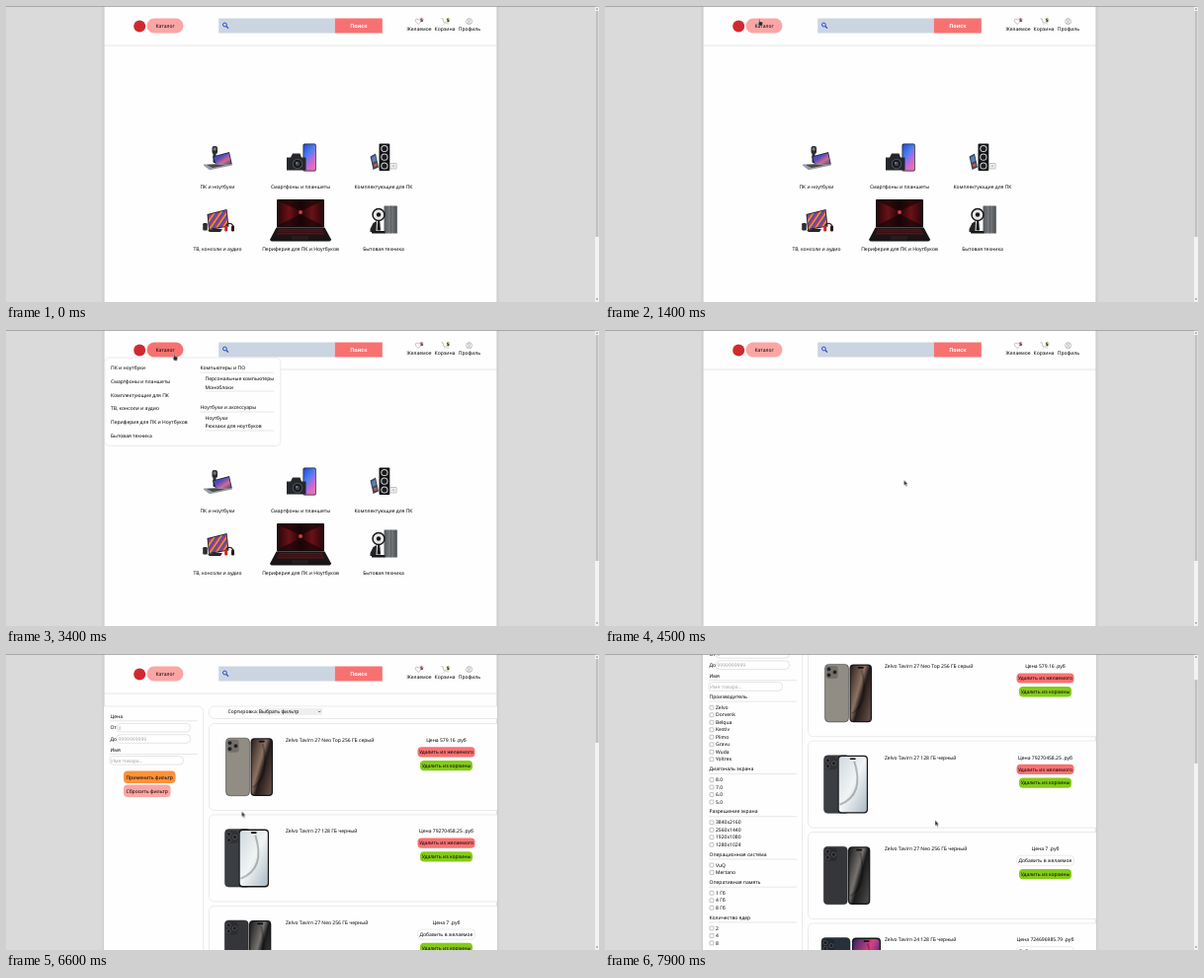
An HTML page for the animation above (8000 ms loop, 600 px wide and 300 px high).

```html
<!DOCTYPE html>
<html lang="ru">
<head>
<meta charset="utf-8">
<title>Каталог</title>
<style>
html, body { margin: 0; width: 100%; height: 100%; overflow: hidden; background: #dadada; }
svg { display: block; width: 600px; height: 300px; }
text { font: 5px "Noto Sans", "Open Sans", sans-serif; fill: #000; text-rendering: geometricPrecision; white-space: pre; }
.mid { text-anchor: middle; }
.hint { fill: #a6a6a6; }
.find { font-weight: 600; font-size: 5.4px; fill: #fff; }
.count { font-weight: 700; font-size: 4.6px; }
.line { stroke: #cfcfcf; stroke-width: .5; }
.box { fill: #fefefe; stroke: #dedede; stroke-width: .6; }
.field { fill: #fff; stroke: #cbcbcb; stroke-width: .5; }
.check { fill: #fff; stroke: #777; stroke-width: .45; }
.icon { fill: none; stroke: #999; stroke-width: .6; }
.column { fill: #fefefe; filter: drop-shadow(0 0 1.5px rgba(0,0,0,.22)); }

.home, .menu, .sub, .shop, .short, .extra, .early, .arrow, .hand { animation: 8s step-end infinite; }
.home { animation-name: home; }
.menu { animation-name: menu; }
.sub { animation-name: sub; }
.shop { animation-name: shop; }
.short { animation-name: short; }
.extra { animation-name: extra; }
.early { animation-name: early; }
.arrow { animation-name: arrow; }
.hand { animation-name: hand; }
.scroll { animation: scroll 8s linear infinite; }
.thumb { animation: thumb 8s linear infinite; }
.catalog { animation: catalog 8s linear infinite; }
.cursor { animation: move 8s ease-in-out infinite; }

@keyframes home { 0% { visibility: visible } 54.4%, 100% { visibility: hidden } }
@keyframes menu { 0% { visibility: hidden } 19.4% { visibility: visible } 47%, 100% { visibility: hidden } }
@keyframes sub { 0% { visibility: hidden } 58.75% { visibility: visible } 78.1%, 100% { visibility: hidden } }
@keyframes shop { 0% { visibility: hidden } 80.6%, 100% { visibility: visible } }
@keyframes short { 0% { visibility: visible } 80.6%, 100% { visibility: hidden } }
@keyframes early { 0% { visibility: hidden } 80.6% { visibility: visible } 84.4%, 100% { visibility: hidden } }
@keyframes extra { 0% { visibility: hidden } 84.4%, 100% { visibility: visible } }
@keyframes arrow {
  0% { visibility: hidden } 1.2% { visibility: visible } 15% { visibility: hidden }
  54.4% { visibility: visible } 58.75% { visibility: hidden } 78.1%, 100% { visibility: visible }
}
@keyframes hand {
  0% { visibility: hidden } 15% { visibility: visible } 54.4% { visibility: hidden }
  58.75% { visibility: visible } 78.1%, 100% { visibility: hidden }
}
@keyframes catalog { 0%, 17.6% { fill: #fca5a5 } 19.4%, 46% { fill: #f87171 } 48%, 100% { fill: #fca5a5 } }
@keyframes scroll { 0%, 91.2% { transform: none } 98%, 100% { transform: translateY(-74.8px) } }
@keyframes thumb { 0%, 91.2% { transform: none } 98%, 100% { transform: translateY(21px) } }
@keyframes move {
  0%, 1.5% { transform: translate(300px, 225px) }
  15.6%, 18% { transform: translate(155px, 13px) }
  21% { transform: translate(160px, 19px) }
  25% { transform: translate(150px, 37px) }
  29% { transform: translate(142px, 64px) }
  34% { transform: translate(212px, 58px) }
  38% { transform: translate(200px, 48px) }
  41.2%, 44.4% { transform: translate(169px, 23.7px) }
  52% { transform: translate(302px, 150px) }
  56.2%, 58.75% { transform: translate(302.5px, 152px) }
  67.5%, 78.1% { transform: translate(225px, 154px) }
  82%, 83.5% { transform: translate(238.5px, 159.5px) }
  90%, 100% { transform: translate(334px, 168.5px) }
}
</style>
</head>
<body>
<svg viewBox="0 0 600 300" xmlns="http://www.w3.org/2000/svg">
  <defs>
    <clipPath id="clip"><rect x="99.5" y="0" width="397" height="600"/></clipPath>
    <linearGradient id="vivid" x2="1" y2="1"><stop stop-color="#2a3f9c"/><stop offset=".4" stop-color="#5a4fc0"/><stop offset=".65" stop-color="#d9688a"/><stop offset="1" stop-color="#28489c"/></linearGradient>
    <linearGradient id="stripes" x2=".22" y2=".14" spreadMethod="repeat"><stop stop-color="#c4262f"/><stop offset=".35" stop-color="#e9a82f"/><stop offset=".6" stop-color="#3a52c4"/><stop offset="1" stop-color="#c12f84"/></linearGradient>
    <linearGradient id="sky" x2=".6" y2="1"><stop stop-color="#2348cf"/><stop offset=".45" stop-color="#4e7ff0"/><stop offset=".7" stop-color="#b06be0"/><stop offset="1" stop-color="#e86fb4"/></linearGradient>
    <linearGradient id="violet" x2=".5" y2="1"><stop stop-color="#3f55b8"/><stop offset=".5" stop-color="#5a3fb0"/><stop offset="1" stop-color="#4f86cf"/></linearGradient>
    <linearGradient id="bronze" x2="1" y2=".8"><stop stop-color="#2a211e"/><stop offset=".45" stop-color="#8c7263"/><stop offset=".6" stop-color="#231b19"/><stop offset="1" stop-color="#5e4a41"/></linearGradient>
    <linearGradient id="ice" x2="1" y2="1"><stop stop-color="#cfd8de"/><stop offset=".5" stop-color="#f1f4f5"/><stop offset="1" stop-color="#a9b9c4"/></linearGradient>
    <linearGradient id="smoke" x2="1" y2=".8"><stop stop-color="#1b1b1d"/><stop offset=".45" stop-color="#77736f"/><stop offset=".6" stop-color="#1a1a1b"/><stop offset="1" stop-color="#474543"/></linearGradient>
    <linearGradient id="neon" x2="1" y2="1"><stop stop-color="#33246b"/><stop offset=".4" stop-color="#d9417f"/><stop offset=".65" stop-color="#3c2f8f"/><stop offset="1" stop-color="#e0645c"/></linearGradient>
    <linearGradient id="ember"><stop stop-color="#2a080b"/><stop offset=".25" stop-color="#6b1117"/><stop offset=".5" stop-color="#1c0608"/><stop offset=".75" stop-color="#6b1117"/><stop offset="1" stop-color="#2a080b"/></linearGradient>
    <linearGradient id="steel"><stop stop-color="#55585c"/><stop offset=".5" stop-color="#7d8083"/><stop offset="1" stop-color="#4a4d50"/></linearGradient>
  </defs>
  <rect class="column" x="99.5" y="-10" width="397" height="320"/>
  <g clip-path="url(#clip)"><g class="scroll" id="page"></g></g>
  <rect width="600" height=".8" fill="#9c9c9c"/>
  <rect x="596" y=".8" width="4" height="300" fill="#f3f3f3"/>
  <path d="M596.9 3.6h2.2l-1.1-1.5zM596.9 296.6h2.2l-1.1 1.5z" fill="#666"/>
  <rect class="short" x="596.5" y="5" width="3" height="229" fill="#c0c0c0"/>
  <g class="shop"><rect class="thumb" x="596.5" y="5" width="3" height="85" fill="#c0c0c0"/></g>
  <g class="cursor" stroke="#fff" stroke-width=".35" fill="#2b2b2b" stroke-linejoin="round">
    <path class="arrow" d="M0 0V5.6L1.3 4.5 2.2 6.6 3.2 6.2 2.3 4.2H4z"/>
    <path class="hand" d="M.6.5Q1.2-.2 1.7.5V2.7L4.2 3.2Q4.9 3.5 4.7 4.3L4.1 7.2H1.3L-.5 4.6Q-.3 3.8.6 4.4z"/>
  </g>
</svg>
<script>
// Text is placed by its vertical centre.
const text = (x, y, s, cls = '') => `<text x="${x}" y="${y + 1.8}" class="${cls}">${s}</text>`;
const mid = (x, y, s, cls = '') => text(x, y, s, 'mid ' + cls);
const rect = (x, y, w, h, fill, r = 0, more = '') =>
  `<rect x="${x}" y="${y}" width="${w}" height="${h}" rx="${r}" ${fill ? `fill="${fill}"` : ''} ${more}/>`;
const frame = (x, y, w, h, r, cls) => rect(x, y, w, h, '', r, `class="${cls}"`);
const disc = (x, y, r, fill, more = '') => `<circle cx="${x}" cy="${y}" r="${r}" fill="${fill}" ${more}/>`;
const path = (d, fill, more = '') => `<path d="${d}" fill="${fill}" ${more}/>`;
const rule = (x1, x2, y) => `<path class="line" d="M${x1} ${y}H${x2}"/>`;
const group = (cls, ...parts) => `<g class="${cls}">${parts.join('')}</g>`;
const ring = (color, w) => `stroke="${color}" stroke-width="${w}"`;

const kinds = ['ПК и ноутбуки', 'Смартфоны и планшеты', 'Комплектующие для ПК',
  'ТВ, консоли и аудио', 'Периферия для ПК и Ноутбуков', 'Бытовая техника'];

const header = () => [
  disc(135.2, 20.5, 6, '#cf2a30'),
  rect(142.5, 12.5, 37, 15, '', 7.5, 'class="catalog"'),
  mid(161, 20, 'Каталог'),
  rect(215.2, 12.5, 117.6, 15, '#cbd5e1'),
  disc(221.4, 19, 1.9, 'none', ring('#1d3fd0', .9)),
  path('M222.8 20.5L225 22.7', 'none', ring('#1d3fd0', 1.1)),
  rect(332.8, 12.5, 48, 15, '#f87171'),
  mid(356.8, 20, 'Поиск', 'find'),
  '<path class="icon" d="M417.2 18.6L414.6 15.8Q413.6 13.8 415.2 13.1 416.6 12.8 417.2 14.2 418 12.8 419.2 13.1 420.8 13.9 419.8 15.8z"/>',
  disc(420.6, 14, 2.3, '#fbd0d0'), mid(420.6, 14, '5', 'count'),
  '<path class="icon" d="M440.5 12.8H442L443.2 17H447.6L448.6 13.8M443.4 18.4h.6M446.8 18.4h.6"/>',
  disc(447.4, 14, 2.3, '#dcefb4'), mid(447.4, 14, '5', 'count'),
  '<path class="icon" d="M471.6 15.6a3 3 0 1 1-6 0a3 3 0 1 1 6 0M469.8 14.8a1.2 1.2 0 1 1-2.4 0a1.2 1.2 0 1 1 2.4 0M466.6 17.7Q468.6 15.8 470.6 17.7"/>',
  mid(418, 23.3, 'Желаемое'), mid(444, 23.3, 'Корзина'), mid(469, 23.3, 'Профиль'),
  rule(99, 497, 40)
].join('');

const art = [
  // laptop with a small camera
  rect(208.5, 142, 5.5, 8, '#2a2b30', 2) + disc(211.2, 145, 1.7, '#777') + rect(209.5, 149, 3, 10, '#2c2c33', 1) +
  path('M209 152.5L226 148 228.8 160.5 212.5 162z', '#1f2028') +
  path('M210 153L225.4 149 227.9 159.8 213 161.2z', 'url(#vivid)') +
  path('M200 160.5L211.5 160 228.8 160.5 228.8 161.6 206 166.2 200 161.8z', '#9a9da2') +
  path('M203 161L212.5 160.6 222 161.6 209 164z', '#45484f'),
  // camera and phone
  rect(300.5, 139.5, 13.2, 28, '#17181d', 1.6) + rect(301.2, 140.3, 11.8, 26.4, 'url(#sky)', 1) +
  path('M284 153.5H288L290 149.5H297.5L299 153.5H303.5V166.5H284z', '#25272b') +
  disc(295, 160, 5.2, '#50545a') + disc(295, 160, 4.2, '#17191d') + disc(295, 160, 2.2, '#3d4652') + disc(294, 159, .8, '#9db0c4'),
  // graphics card, case and power unit
  rect(377.5, 139.5, 10.8, 27.5, '#111214', 1) + [144.5, 153.2, 162].map(y => disc(382.9, y, 3.6, '#d4d5d7') + disc(382.9, y, 2.6, '#1b1c1f')).join('') +
  path('M368.5 152.5L374 149.5 377 163.5 371.5 166z', '#3b4558') + path('M370 153.5L373.5 151.5 374.7 157 371.2 159z', '#5d7fb4') +
  path('M372 160.5L375 159 375.6 162 372.7 163.5z', '#c05a4d') +
  rect(388.8, 159.5, 6.3, 5.5, '#f6f6f6', .4, ring('#888', .5)) + disc(392, 162.2, 1.4, '#ccc'),
  // television and headphones
  path('M203.5 211L223.5 206 225.5 223.5 205 227z', '#1b1c22') +
  path('M204.4 211.7L222.8 207.1 224.6 222.7 205.7 226z', 'url(#stripes)') +
  rect(199.2, 220, 4.6, 7.5, '#2c2d33', 1.2) + path('M204 227.5L211 225.5 219 226 217 229 206 229z', '#26272c') +
  path('M222.3 224A4 5 0 0 1 230 224', 'none', ring('#27282c', 1.2)) +
  rect(221.2, 222.5, 3, 6, '#c7252f', 1.2) + rect(228, 222.5, 3, 6, '#2a1517', 1.2),
  // gaming laptop
  rect(274, 196, 48, 28.5, '#120709', 1) + rect(275.3, 197.2, 45.4, 25.4, 'url(#ember)') +
  path('M275.3 197.2H320.7L298 208z', '#160507', 'opacity=".7"') +
  path('M275.3 222.6L298 211 320.7 222.6z', '#160507', 'opacity=".7"') +
  disc(298, 209, 2, '#d33a40') +
  path('M273.5 224.5H322.5L329 236.5Q329 238.5 327 238.5H269Q267 238.5 267.2 236.5z', '#191517') +
  path('M276 226H320L322.5 231.5H273.5z', '#5e1218') + path('M275.5 227.8H320.8M274.3 229.7H321.8', 'none', ring('#1d1012', .7)) +
  rect(289, 233, 17, 4, '#241d20', .4),
  // fan and fridge
  rect(382.5, 202.5, 13.3, 28, 'url(#steel)', .6) + path('M389.4 202.5V230.5', 'none', ring('#34373a', .5)) +
  disc(377, 211.5, 6, '#e8e8e8', ring('#151618', 1.5)) + disc(377, 211.5, 2.2, '#151618') +
  path('M376 217.5H378.2L379 227.5H375.5z', '#151618') +
  path('M371.5 220L375 218 374.5 229H368.5V226z', '#222326') + rect(370, 228, 13.5, 2.6, '#151618', 1.2)
];

const home = () => group('home', ...kinds.map((name, i) =>
  art[i] + mid(214 + 84 * (i % 3), i < 3 ? 183.4 : 246.4, name)));

const menuPart = (y, title, items, end) => text(196.5, y, title) + rule(196, 271, y + 5) +
  items.map((s, i) => text(201.5, y + 11 + i * 8.6, s)).join('') + rule(201, 271, end);

const menu = () => group('menu',
  frame(99.8, 28, 178, 89.5, 5, 'box'),
  ...kinds.map((s, i) => text(106, 38.2 + i * 13.8, s)),
  menuPart(38.2, 'Компьютеры и ПО', ['Персональные компьютеры', 'Моноблоки'], 62),
  menuPart(78, 'Ноутбуки и аксессуары', ['Ноутбуки', 'Рюкзаки для ноутбуков'], 102));

const sub = () => group('sub',
  rect(193, 127.5, 21.8, 47.5, '#1d2140', 2.2), rect(193.9, 128.5, 20, 45.5, 'url(#violet)', 1.5),
  path('M194 160Q201 145 206 154T214 146V172Q204 176 194 172z', '#3a7fc0', 'opacity=".55"'),
  path('M199 146L208 139 205 152z', '#2b2470', 'opacity=".6"'), disc(204, 130.5, .7, '#111'),
  path('M220 142H233L235 151H218zM218 165H235L233 175H220z', '#d9763a'),
  disc(226.6, 158, 10, '#3a3c40'), disc(226.6, 158, 8.4, '#17181b'),
  disc(226.6, 158, 6.2, 'none', ring('#8a7b68', .6)), rect(236, 155.5, 1.6, 3, '#3a3c40', .5),
  mid(214.7, 181.2, 'Смартфоны и гаджеты'),
  path('M278.5 130.5L296.5 130.5Q298.3 130.5 298.4 132.5L299.3 174Q299.3 177 296.8 177L279 175.5Q277 175 277 173V132.5Q277 130.5 278.5 130.5z', '#202329'),
  path('M278.3 132H297L298 175 278.3 173.8z', '#30363c'),
  path('M278.3 132H297L297.2 143 278.3 160z', '#c96a5b'), path('M278.3 132H290L278.3 146z', '#e6958c'),
  path('M297.2 143L298 168 284 174.2 278.3 160z', '#23464a'),
  rect(300, 140.5, 21, 36.5, '#292a2d', 1.4), rect(302, 142.5, 17, 31, '#e9e9e7'),
  path('M307 151L310.5 145 314 151z', '#333'),
  mid(310.5, 155.5, 'КНИГА', 'count'),
  ...[160, 163.5, 167, 170.5].map(y => path(`M304 ${y}h4m1.5 0h2m1.5 0h4`, 'none', ring('#444', .9))),
  mid(298, 183.6, 'Планшеты, электронные книги'));

const goods = [
  { name: 'Zelvo Tavirn 27 Neo Top 256 ГБ серый', price: '579.16', wished: true, back: [222.5, 24], front: [247.5, 22.5], body: '#918c84', screen: 'bronze' },
  { name: 'Zelvo Tavirn 27 128 ГБ черный', price: '79270458.25', wished: true, back: [221.5, 26], front: [235.5, 30.5], body: '#3b3e43', screen: 'ice' },
  { name: 'Zelvo Tavirn 27 Neo 256 ГБ черный', price: '7', back: [221.3, 24], front: [246, 22.3], body: '#35363a', screen: 'smoke' },
  { name: 'Zelvo Tavirn 24 128 ГБ черный', price: '724696985.79', back: [219, 29], front: [250, 29], body: '#26303d', screen: 'neon' }
];

const phones = ({ back: [bx, bw], front: [fx, fw], body, screen }, y) =>
  rect(bx, y, bw, 58.5, body, 4, ring('#2b2b2d', .5)) +
  rect(bx + 1.2, y + 1.5, 12, 13, '#000', 3, 'opacity=".2"') +
  [[4, 5], [4, 11], [10, 8]].map(([dx, dy]) => disc(bx + dx, y + dy, 2.1, '#1c1c1f', ring('#777', .5))).join('') +
  rect(fx, y, fw, 58.8, '#161618', 4) +
  rect(fx + 1.2, y + 1.3, fw - 2.4, 56.2, `url(#${screen})`, 3) +
  path(`M${fx + 2} ${y + 50}Q${fx + fw * .9} ${y + 40} ${fx + fw * .55} ${y + 6}`, 'none', ring('#000', 2) + ' opacity=".25"') +
  rect(fx + fw / 2 - 3, y + 2.6, 6, 1.7, '#0c0c0d', .8);

const card = (item, i) => {
  const y = 87.2 + 92.4 * i;
  const wish = item.wished
    ? rect(416.5, y + 7, 58, 10.2, '#f87171', 4) + mid(445.5, y + 12, 'Удалить из желаемого')
    : frame(416.5, y + 7, 58, 10.2, 4, 'box') + mid(445.5, y + 12, 'Добавить в желаемое');
  return frame(205.5, y - 16.7, 300, 88, 5, 'box') + phones(item, y - 2) +
    text(283, y, item.name) + mid(445.5, y, `Цена ${item.price} .руб`) + wish +
    rect(419, y + 20.7, 53, 10.3, '#84cc16', 4) + mid(445.5, y + 25.8, 'Удалить из корзины');
};

const filters = [
  ['Производитель', 'Zelvo Dorvenk Belqua Kestiv Plimo Gravu Wuda Yoltrex'],
  ['Диагональ экрана', '8.0 7.0 6.0 5.0'],
  ['Разрешение экрана', '3840x2160 2560x1440 1920x1080 1280x1024'],
  ['Операционная система', 'VuQ Mertano'],
  ['Оперативная память', '1_Гб 4_Гб 8_Гб'],
  ['Количество ядер', '2 4 8']
];

const filterList = () => {
  let y = 118;
  return filters.map(([title, list]) => {
    let out = text(105.5, y, title) + rule(105, 194, y + 5);
    y += 11;
    for (const s of list.split(' ')) {
      out += frame(106, y - 1.9, 3.9, 3.9, .6, 'check') + text(112, y, s.replace('_', ' '));
      y += 7.5;
    }
    y += 2.25;
    return out;
  }).join('');
};

const shop = () => group('shop',
  frame(90, 53, 109.5, 500, 5, 'box'),
  text(105.5, 63.2, 'Цена'), rule(105, 194, 67.8),
  text(105.5, 74.6, 'От'), frame(112, 70.4, 74.5, 8.6, 4, 'field'), text(113.5, 74.7, '0', 'hint'),
  text(105.5, 86, 'До'), frame(112, 81.7, 74.5, 8.6, 4, 'field'), text(113.5, 86, '9999999999', 'hint'),
  text(105.5, 96.7, 'Имя'), rule(105, 194, 101.5),
  frame(104.5, 103.5, 75, 8.6, 4, 'field'), text(106, 107.8, 'Имя товара...', 'hint'),
  frame(205.5, 53, 300, 12.5, 5, 'box'),
  text(224.5, 58.5, 'Сортировка:'),
  rect(254.5, 55, 65.5, 7, '#efefef', .8), text(255.8, 58.5, 'Выбрать фильтр'),
  path('M316 57.7l1.2 1.3 1.2-1.3', 'none', ring('#222', .6)),
  ...goods.map(card)) +
  group('early',
    rect(119, 118.5, 52.5, 12.6, '#fb923c', 4), mid(145.2, 124.8, 'Применить фильтр'),
    rect(119, 132.5, 47.5, 12.6, '#fca5a5', 4), mid(142.7, 138.8, 'Сбросить фильтр')) +
  group('extra', filterList());

document.getElementById('page').innerHTML = header() + home() + sub() + shop() + menu();
</script>
</body>
</html>
```
